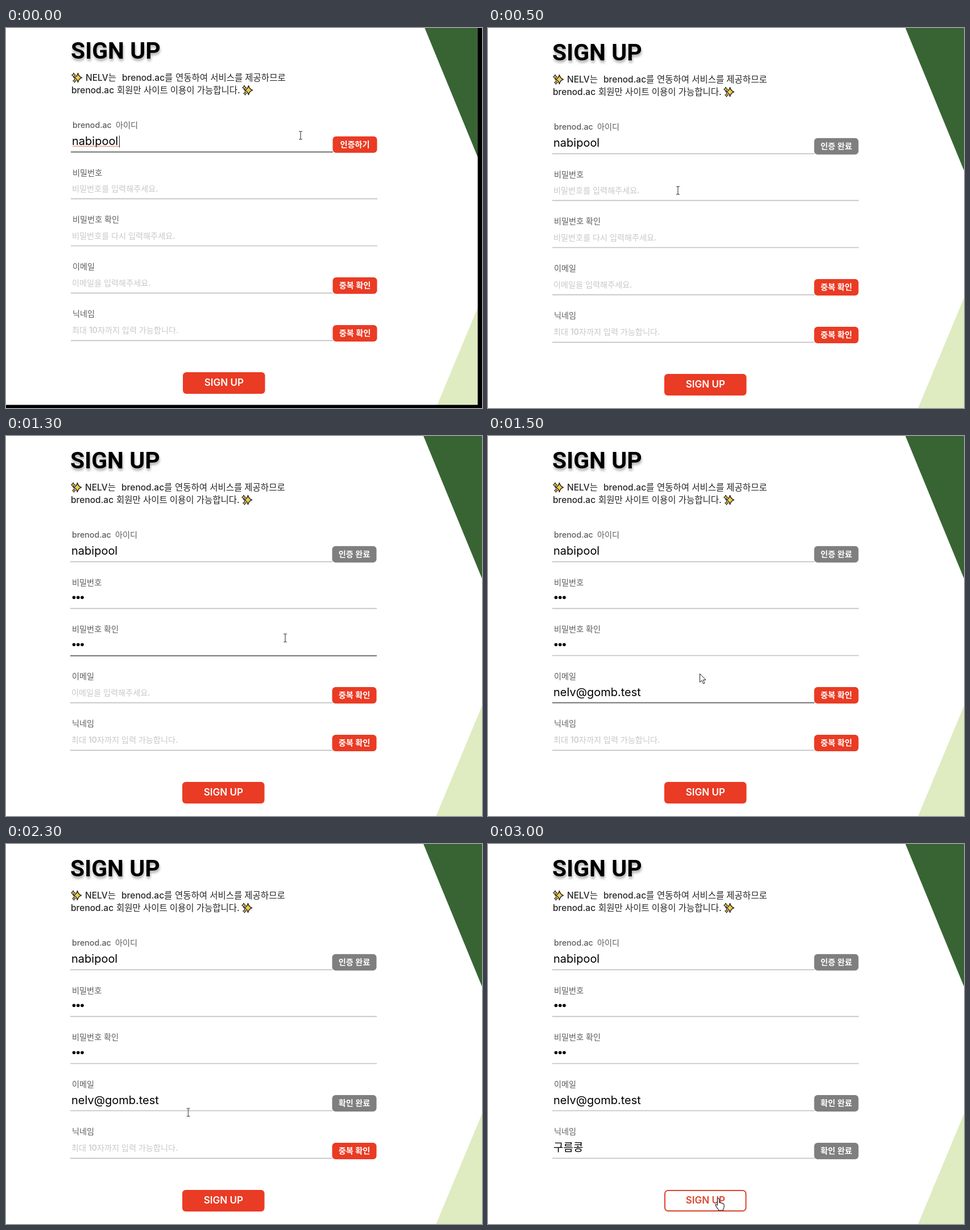
These frames come from a looping animation (837 by 669 pixels, 3500 ms). An HTML page:

```html
<!DOCTYPE html>
<html lang="ko">
<head>
<meta charset="utf-8">
<title>Sign up</title>
<style>
html, body { margin: 0; width: 100%; height: 100%; overflow: hidden; background: #fff; }
svg { display: block; width: 837px; height: 669px; }
text { font: 500 14.2px Inter, "Noto Sans CJK KR", sans-serif; fill: #5c5c5c; }
.title { font: 700 41px Roboto, sans-serif; fill: #000; text-shadow: 1px 4px 4px rgba(0, 0, 0, .32); }
.intro text { font-size: 15.5px; fill: #262626; }
.hint { fill: #c8c8c8; }
.value { font-size: 20px; font-weight: 400; fill: #000; }
.name { font-size: 19px; }
.btn text { font-weight: 700; fill: #fff; text-anchor: middle; }
.btn .big { font-size: 17px; font-weight: 600; }
.red { fill: #ea3b24; }
.grey { fill: #7f7f7f; }
.line, .focus { fill: none; stroke: #c2c2c2; stroke-width: 1.7; }
.focus { stroke: #5b5b5b; }
.caret { fill: none; stroke: #222; stroke-width: 1; }

/* --in: step at which a part appears, --out: step at which it goes */
.t { animation: var(--in, none) 3.5s step-end infinite, var(--out, none) 3.5s step-end infinite; }
.page { animation: settle 3.5s step-end infinite; }
@keyframes settle { from { transform: translate(1px, -3px); } 14.2857% { transform: none; } }
@keyframes in1 { from { visibility: hidden; } 14.2857% { visibility: visible; } }
@keyframes in2 { from { visibility: hidden; } 28.5714% { visibility: visible; } }
@keyframes in3 { from { visibility: hidden; } 42.8571% { visibility: visible; } }
@keyframes in4 { from { visibility: hidden; } 57.1428% { visibility: visible; } }
@keyframes in5 { from { visibility: hidden; } 71.4285% { visibility: visible; } }
@keyframes in6 { from { visibility: hidden; } 85.7142% { visibility: visible; } }
@keyframes out1 { from { opacity: 1; } 14.2857%, to { opacity: 0; } }
@keyframes out2 { from { opacity: 1; } 28.5714%, to { opacity: 0; } }
@keyframes out3 { from { opacity: 1; } 42.8571%, to { opacity: 0; } }
@keyframes out4 { from { opacity: 1; } 57.1428%, to { opacity: 0; } }
@keyframes out5 { from { opacity: 1; } 71.4285%, to { opacity: 0; } }
@keyframes out6 { from { opacity: 1; } 85.7142%, to { opacity: 0; } }
</style>
</head>
<body>
<svg viewBox="0 0 837 669">
  <defs>
    <path id="star" d="M0-8Q1.6-1.6 7 0Q1.6 1.6 0 8Q-1.6 1.6-7 0Q-1.6-1.6 0-8Z"/>
    <g id="sparkles" fill="#f9cf3a" stroke="#2b2a26" stroke-linejoin="round">
      <use href="#star" x="2.5" stroke-width="1.5"/>
      <use href="#star" transform="translate(-5 -4.5) scale(.48)" stroke-width="2.6"/>
      <use href="#star" transform="translate(-3.5 5.5) scale(.4)" stroke-width="2.8"/>
    </g>
    <rect id="box" x="573.5" y="-27.5" width="78" height="29" rx="6"/>
    <path id="short" d="M113 0H574"/>
    <path id="long" d="M113 0H652"/>
    <g id="dots">
      <circle cx="119.5" r="2.8"/><circle cx="126.8" r="2.8"/><circle cx="134" r="2.8"/>
    </g>
    <g id="beam" fill="none">
      <path d="M-3-7H-1L0-6L1-7H3M0-6V6M-3 7H-1L0 6L1 7H3" stroke="#333" stroke-width="1.1"/>
    </g>
    <path id="arrow" d="M.5.5V15.5L4 12.3L6.6 18.2L9 17.1L6.4 11.4H11Z" fill="#fff" stroke="#222" stroke-linejoin="round"/>
    <path id="hand" d="M-2 12V1.5a1.6 1.6 0 0 1 3.2 0V7.5q2.6-1.2 3 .8q2.4-.8 2.8 .9q2.6-.3 2.6 1.8v4q0 2-1.6 3.6v2.4h-8.5v-1.8q-2.5-2.4-5-7.2q.2-2.4 2.5-.6z" fill="#fff" stroke="#222" stroke-width="1.1" stroke-linejoin="round"/>
  </defs>

  <g class="page">
    <path d="M732.8-3L837 251H850V-3Z" fill="#386434"/>
    <path d="M850 444L837 475L755 672H850Z" fill="#dfebc1"/>

    <text class="title" x="113" y="57">SIGN UP</text>
    <g class="intro">
      <use href="#sparkles" x="123" y="90.5"/>
      <text y="96"><tspan x="139">NELV는</tspan> <tspan x="203">brenod.ac를</tspan> <tspan x="297">연동하여 서비스를 제공하므로</tspan></text>
      <text y="118"><tspan x="114">brenod.ac</tspan> <tspan x="194">회원만 사이트 이용이 가능합니다.</tspan></text>
      <use href="#sparkles" x="423" y="112.5"/>
    </g>

    <g transform="translate(0 221.3)">
      <text y="-42"><tspan x="116">brenod.ac</tspan> <tspan x="192">아이디</tspan></text>
      <text class="value" x="115" y="-12.5">nabipool</text>
      <use href="#short" class="line"/>
      <g class="t" style="--out:out1">
        <use href="#short" class="focus"/>
        <path d="M116-10H198" stroke="#e8604f" fill="none"/>
        <path class="caret" d="M198.5-29V-8"/>
      </g>
      <g class="btn t" style="--out:out1"><use href="#box" class="red"/><text x="612.5" y="-8.5">인증하기</text></g>
      <g class="btn t" style="--in:in1"><use href="#box" class="grey"/><text x="612.5" y="-8.5">인증 완료</text></g>
    </g>

    <g transform="translate(0 303.6)">
      <text x="116" y="-41">비밀번호</text>
      <text class="hint t" style="--out:out2" x="115" y="-12.5">비밀번호를 입력해주세요.</text>
      <use href="#dots" y="-19.3" class="t" style="--in:in2"/>
      <use href="#long" class="line"/>
    </g>

    <g transform="translate(0 386.5)">
      <text x="116" y="-41.5">비밀번호 확인</text>
      <text class="hint t" style="--out:out2" x="115" y="-12.5">비밀번호를 다시 입력해주세요.</text>
      <use href="#dots" y="-19.3" class="t" style="--in:in2"/>
      <use href="#long" class="line"/>
      <use href="#long" class="focus t" style="--in:in2;--out:out3"/>
    </g>

    <g transform="translate(0 469.6)">
      <text x="116" y="-41.5">이메일</text>
      <text class="hint t" style="--out:out3" x="115" y="-12.5">이메일을 입력해주세요.</text>
      <text class="value t" style="--in:in3" x="115" y="-12">nelv@gomb.test</text>
      <use href="#short" class="line"/>
      <use href="#short" class="focus t" style="--in:in3;--out:out4"/>
      <g class="btn t" style="--out:out4"><use href="#box" class="red"/><text x="612.5" y="-8.5">중복 확인</text></g>
      <g class="btn t" style="--in:in4"><use href="#box" class="grey"/><text x="612.5" y="-8.5">확인 완료</text></g>
    </g>

    <g transform="translate(0 553.4)">
      <text x="116" y="-42">닉네임</text>
      <text class="hint t" style="--out:out5" x="115" y="-13">최대 10자까지 입력 가능합니다.</text>
      <text class="value name t" style="--in:in5" x="115" y="-12.5">구름콩</text>
      <use href="#short" class="line"/>
      <g class="t" style="--in:in5;--out:out6">
        <use href="#short" class="focus"/>
        <path class="caret" d="M151-8.9H167.5V-29"/>
      </g>
      <g class="btn t" style="--out:out6"><use href="#box" class="red"/><text x="612.5" y="-8.5">중복 확인</text></g>
      <g class="btn t" style="--in:in6"><use href="#box" class="grey"/><text x="612.5" y="-8.5">확인 완료</text></g>
    </g>

    <g class="btn t" style="--out:out6">
      <rect class="red" x="310" y="609" width="144.5" height="38" rx="6"/>
      <text class="big" x="382.3" y="633">SIGN UP</text>
    </g>
    <g class="btn t" style="--in:in6">
      <rect x="311" y="610" width="142.5" height="36" rx="5.5" fill="#fff" stroke="#d9432e" stroke-width="2"/>
      <text class="big" x="382.3" y="633" style="fill:#dd4631">SIGN UP</text>
    </g>
  </g>

  <path class="t" style="--out:out1" d="M829.5 0H837V669H0V663.5H829.5Z"/>

  <use href="#beam" x="518" y="189" class="t" style="--out:out1"/>
  <use href="#beam" x="334" y="286" class="t" style="--in:in1;--out:out2"/>
  <use href="#beam" x="491" y="355.5" class="t" style="--in:in2;--out:out3"/>
  <use href="#arrow" x="372" y="418" class="t" style="--in:in3;--out:out4"/>
  <use href="#beam" x="320.5" y="472.5" class="t" style="--in:in4;--out:out5"/>
  <use href="#hand" x="584" y="546" class="t" style="--in:in5;--out:out6"/>
  <use href="#hand" x="405.5" y="624" class="t" style="--in:in6"/>
</svg>
</body>
</html>
```
